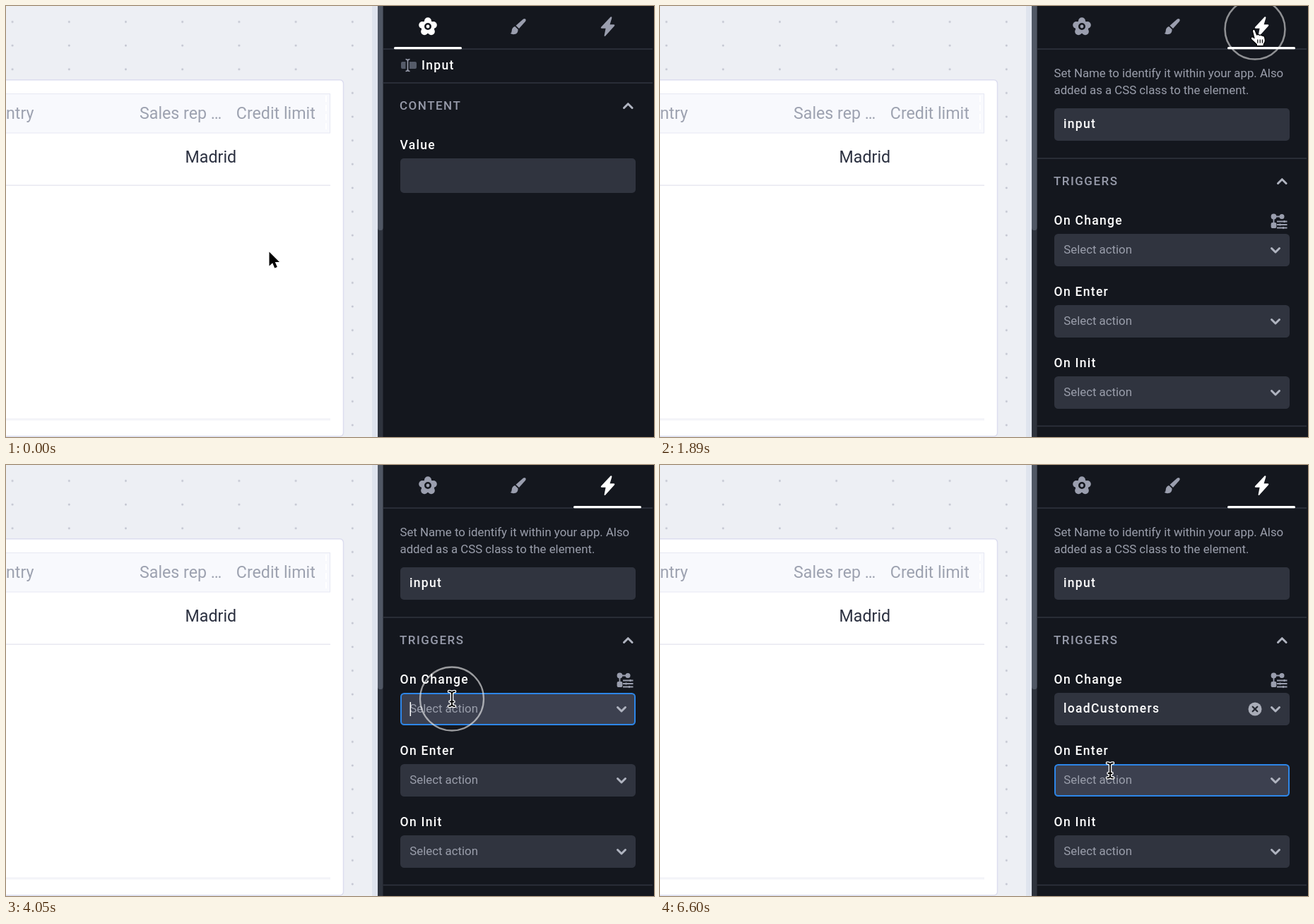
An HTML page for the animation above (7470 ms loop, 917 px wide and 611 px high).

```html
<!DOCTYPE html>
<html lang="en">
<head>
<meta charset="utf-8">
<title>Choosing an action for an input</title>
<style>
  html, body { margin: 0; width: 100%; height: 100%; overflow: hidden; background: #14171e; }
  svg { display: block; width: 917px; height: 611px; font-family: Roboto, sans-serif; }
  text { white-space: pre; }
  .cell { font-size: 23.2px; fill: #9da2b0; }
  .body { font-size: 16.8px; fill: #9a9eab; }
  .label { font-size: 17.5px; font-weight: 500; letter-spacing: 1.3px; fill: #fff; }
  .section { font-size: 17px; font-weight: 500; letter-spacing: 1.5px; fill: #979baa; }
  .add { font-size: 15.8px; font-weight: 500; letter-spacing: 1.25px; }
  .field { fill: #30343f; }
  .rule { stroke: #30343f; stroke-width: 1.6; }
  .chevron { fill: none; stroke: #b0b4c0; stroke-width: 3; stroke-linecap: round; stroke-linejoin: round; }
</style>
</head>
<body>
<svg viewBox="0 0 917 611">
  <defs>
    <pattern id="dots" x="-31" y="5.7" width="80.2" height="33.63" patternUnits="userSpaceOnUse">
      <circle cx="40.1" cy="16.8" r="1.4" fill="#bfc2ce"/>
    </pattern>
    <path id="beam" fill="none" stroke-linecap="round"
      d="M-4-10.5q4 0 4 3V7.5q0 3-4 3M4-10.5q-4 0-4 3M4 10.5q-4 0-4-3M-2.5 4h5"/>
  </defs>

  <!-- Canvas with the table -->
  <rect width="518" height="611" fill="#edeff4"/>
  <rect width="518" height="611" fill="url(#dots)"/>
  <rect x="-20" y="104.7" width="497.5" height="505.3" rx="5" fill="#fff" stroke="#dcddef" stroke-width="1.5"/>
  <rect x="-20" y="124.5" width="478.5" height="55.5" fill="#f8f9fd" stroke="#e6e8f3"/>
  <path d="M453 127V178" stroke="#fff" stroke-width="2" stroke-dasharray="9 4"/>
  <text class="cell" x="0" y="160">ntry</text>
  <text class="cell" x="189" y="160">Sales rep …</text>
  <text class="cell" x="325.8" y="160">Credit limit</text>
  <text class="cell" x="253.6" y="222" style="fill:#2b3040">Madrid</text>
  <path d="M0 254.3H459" stroke="#e8e8f1" stroke-width="1.4"/>
  <path d="M0 586H459" stroke="#f3f4f8" stroke-width="3"/>

  <!-- Panel and scrollbar -->
  <rect x="518" width="8" height="611" fill="#dfe4ee"/>
  <rect x="526" width="391" height="611" fill="#14171e"/>
  <rect x="526" width="7.5" height="611" fill="#2e333d"/>
  <rect x="526" y="-8" width="7.5" height="326" rx="3.5" fill="#505764"/>
  <path class="rule" d="M533.5 61H915"/>
  <rect id="underline" y="58" width="96" height="3.2" rx="1.5" fill="#fff"/>
  <g id="gear"></g>
  <g fill="#9a9eae">
    <path d="M732 18.6q2-1.4 3.2 0t-.1 3.2L726 32l-4.5-4.2z"/>
    <path d="M720.3 29l4.3 4.2q.2 6-5.2 6.9-3.6.4-5.8-1.4 2.2-.6 2.1-3.5.2-5 4.6-6.2z"/>
  </g>
  <path id="bolt" d="M855.5 15.5L842 30q-1 1.6 1 1.8h5.6l-2 10.2q.2 1.6 1.6.6L861 28.2q1-1.8-1-2h-5.4l2.8-9.5q0-2-1.9-1.2z"/>

  <g id="contentTab">
    <path d="M559 81q0-2 2-2h4.5v10H561q-2 0-2-2zM571 79h8q2 0 2 2v6q0 2-2 2h-8z" fill="#555b69"/>
    <path d="M565.5 75.5q3 0 3 2.5V90q0 2.5-3 2.5M571.5 75.5q-3 0-3 2.5M571.5 92.5q-3 0-3-2.5" fill="none" stroke="#9a9eae" stroke-width="1.6"/>
    <text class="label" x="588" y="90">Input</text>
    <path class="rule" d="M533.5 109H915"/>
    <text class="section" x="557" y="147">CONTENT</text>
    <path class="chevron" d="M874.5 144.5l5.8-5.8 5.8 5.8"/>
    <text class="label" x="557.5" y="202.5">Value</text>
    <rect class="field" x="558" y="216" width="333" height="49" rx="5"/>
  </g>

  <g id="triggerTab">
    <text class="body" x="557.5" y="101">Set Name to identify it within your app. Also</text>
    <text class="body" x="557.5" y="125.3">added as a CSS class to the element.</text>
    <rect class="field" x="558" y="145" width="333" height="46" rx="5"/>
    <text class="label" x="571" y="173">input</text>
    <path class="rule" d="M533.5 216H915M533.5 595.5H915"/>
    <text class="section" x="557" y="253.7">TRIGGERS</text>
    <path class="chevron" d="M874.5 251.5l5.8-5.8 5.8 5.8"/>
    <g fill="#9a9eae" stroke="#9a9eae" stroke-width="1.8">
      <path d="M868.5 298.5H880M868.5 298.5V311M873 305.5h14.5M873 310h14.5M873 314.5h14.5" fill="none"/>
      <circle cx="868.5" cy="298.5" r="3"/><circle cx="880" cy="298.5" r="2.6"/>
      <rect x="865.5" y="308" width="6" height="6" rx="1"/>
      <path d="M883.5 304v3M877.5 308.5v3M882 313v3"/>
    </g>
    <g id="selects"></g>
    <text id="chosen" class="label" x="571" y="351">loadCustomers</text>
    <g id="clear">
      <circle cx="842" cy="346" r="9.5" fill="#a9adb8"/>
      <path d="M838.7 342.7l6.6 6.6m0-6.6l-6.6 6.6" stroke="#262a33" stroke-width="2.3" stroke-linecap="round"/>
    </g>
    <path id="caret" d="M572.3 336V356" stroke="#fff" stroke-width="1.5"/>
    <g id="menu">
      <path id="menuBack" d="M558 454.5V380q0-5 5-5h323q5 0 5 5v74.5z"/>
      <rect id="item" x="558" y="412" width="333" height="42.5" fill="#1f88f0"/>
      <text id="add" class="add" x="636" y="398.5">Add New Action</text>
      <path d="M780 393.5h16M788 385.5v16" stroke="#fff" stroke-width="2.1"/>
      <text class="body" x="569.3" y="438" style="fill:#eef0f4">loadCustomers</text>
    </g>
  </g>

  <circle id="ring" fill="none" stroke="#fff"/>
  <g id="cursor">
    <path id="arrow" d="M.5.5V20.5l4.7-4.3 3 7.4 3.6-1.5-3-7.2h6.2z" stroke="#fff" stroke-width="1.6" paint-order="stroke"/>
    <g id="hand" stroke="#000">
      <path fill="#fff" stroke-width="1.2" stroke-linejoin="round"
        d="M-3.4 3.5c-1-3.4 2.5-4.4 3.6-1.6L2.6 8q2.2-1.3 3.8.5 2-1.2 3.6.7 2.8-.6 3.6 2L14.4 15.5q.2 3.6-2.2 5.6V23.5H2.4V21.5L-4.6 15q-2.4-3 0-4 2-.4 3.6 1.6z"/>
      <path d="M3.8 14.5v5M7.2 14.5v5M10.4 14.5v5" stroke-width="1.2"/>
    </g>
    <g id="ibeam">
      <use href="#beam" stroke="#fff" stroke-width="4.6"/>
      <use href="#beam" stroke="#000" stroke-width="1.8"/>
    </g>
  </g>
</svg>

<script>
const LOOP = 7470, STEP = 30, SPAN = 720;
const BLUE = '#2d86e8', HOVER = '#3c404f', FIELD = '#30343f', MUTED = '#9a9eae';
const el = id => document.getElementById(id);
const show = (id, on) => el(id).style.display = on ? '' : 'none';
const set = (node, attrs) => { for (const key in attrs) node.setAttribute(key, attrs[key]); };

// Five-lobed gear
el('gear').innerHTML = '<circle cx="597" cy="29.5" r="9.5"/>' +
  [0, 1, 2, 3, 4].map(i => {
    const a = (i * 72 - 90) * Math.PI / 180;
    return `<circle cx="${597 + 8.2 * Math.cos(a)}" cy="${29.5 + 8.2 * Math.sin(a)}" r="5"/>`;
  }).join('') + '<circle cx="597" cy="29" r="3.7" fill="none" stroke="#14171e" stroke-width="2.6"/>';

const SELECT_TOPS = [323, 424, 525];
el('selects').innerHTML = ['On Change', 'On Enter', 'On Init'].map((name, i) => {
  const y = SELECT_TOPS[i];
  return `<text class="label" x="557.5" y="${y - 13}">${name}</text>
    <rect x="559" y="${y + 1}" width="331" height="44" rx="4.5" stroke-width="2"/>
    <text class="body" x="571.3" y="${y + 28}">Select action</text>
    <path class="chevron"/>`;
}).join('');
const boxes = document.querySelectorAll('#selects rect');
const hints = document.querySelectorAll('#selects .body');
const chevrons = document.querySelectorAll('#selects .chevron');

const stops = [[372, 348], [842, 33], [631, 331.5], [637, 433]];
const moves = [540, 2640, 4800];
const clicks = [1290, 3390, 5550];
const TAB_AT = 1710, FOCUS_AT = 3750, OPEN_AT = 4140, CARET_OFF = 5400, CHOOSE_AT = 5970;

// Cubic Bezier (.6, 0, .1, 1)
function ease(p) {
  if (p <= 0 || p >= 1) return p <= 0 ? 0 : 1;
  let lo = 0, hi = 1, s;
  for (let i = 0; i < 24; i++) {
    s = (lo + hi) / 2;
    const x = 3 * (1 - s) ** 2 * s * .6 + 3 * (1 - s) * s * s * .1 + s ** 3;
    if (x < p) lo = s; else hi = s;
  }
  return s * s * (3 - 2 * s);
}

function pointer(t) {
  let [x, y] = stops[0];
  moves.forEach((start, i) => {
    const k = ease((t - start) / SPAN);
    x += k * (stops[i + 1][0] - stops[i][0]);
    y += k * (stops[i + 1][1] - stops[i][1]);
  });
  return [x, y];
}

function draw(t) {
  const [x, y] = pointer(t);
  const triggers = t >= TAB_AT, chosen = t >= CHOOSE_AT;
  const open = t >= OPEN_AT && !chosen;
  const focused = t >= FOCUS_AT && !chosen;
  const within = (top, height) => x > 558 && x < 891 && y >= top && y <= top + height;
  const onTabs = x > 533 && y < 61;
  const onMenu = open && within(375, 79.5);
  const onItem = onMenu && y > 420;

  show('contentTab', !triggers);
  show('triggerTab', triggers);
  set(el('underline'), { x: triggers ? 803 : 549 });
  set(el('gear'), { fill: triggers ? MUTED : '#fff' });
  set(el('bolt'), { fill: triggers || (onTabs && x > 800) ? '#fff' : MUTED });

  let onField = triggers ? within(145, 46) : within(216, 49);
  SELECT_TOPS.forEach((top, i) => {
    const hover = triggers && !onMenu && within(top, 46);
    const fill = hover ? HOVER : FIELD;
    onField = onField || hover;
    set(boxes[i], { fill, stroke: hover || (i === 0 && focused) ? BLUE : fill });
    const up = i === 0 && open;
    set(chevrons[i], { d: up ? `M865.5 ${top + 25.5}l5.5-5.5 5.5 5.5` : `M865.5 ${top + 20.5}l5.5 5.5 5.5-5.5` });
  });
  hints[0].style.display = chosen ? 'none' : '';
  show('chosen', chosen);
  show('clear', chosen);
  show('caret', focused && t < CARET_OFF);

  show('menu', open);
  el('menu').style.opacity = Math.min(1, (t - OPEN_AT + STEP) / 210);
  show('item', onItem);
  const onAdd = onMenu && !onItem;
  set(el('menuBack'), { fill: onAdd ? HOVER : FIELD });
  set(el('add'), { fill: onAdd ? '#fff' : '#a2a5ae' });

  const click = clicks.find(c => t >= c && t < c + SPAN);
  show('ring', click !== undefined);
  if (click !== undefined) {
    const age = t - click;
    set(el('ring'), {
      cx: x, cy: y, r: 17.5 + age / 24,
      'stroke-width': 5.2 - age / 225, 'stroke-opacity': .04 + age / 1250
    });
  }

  const shape = onTabs || onMenu ? 'hand' : onField ? 'ibeam' : 'arrow';
  ['hand', 'ibeam', 'arrow'].forEach(id => show(id, id === shape));
  set(el('cursor'), { transform: `translate(${x} ${y})` });
}

function tick() {
  const t = performance.now() % LOOP;
  draw(Math.floor(t / STEP) * STEP);
  requestAnimationFrame(tick);
}
tick();
</script>
</body>
</html>
```
